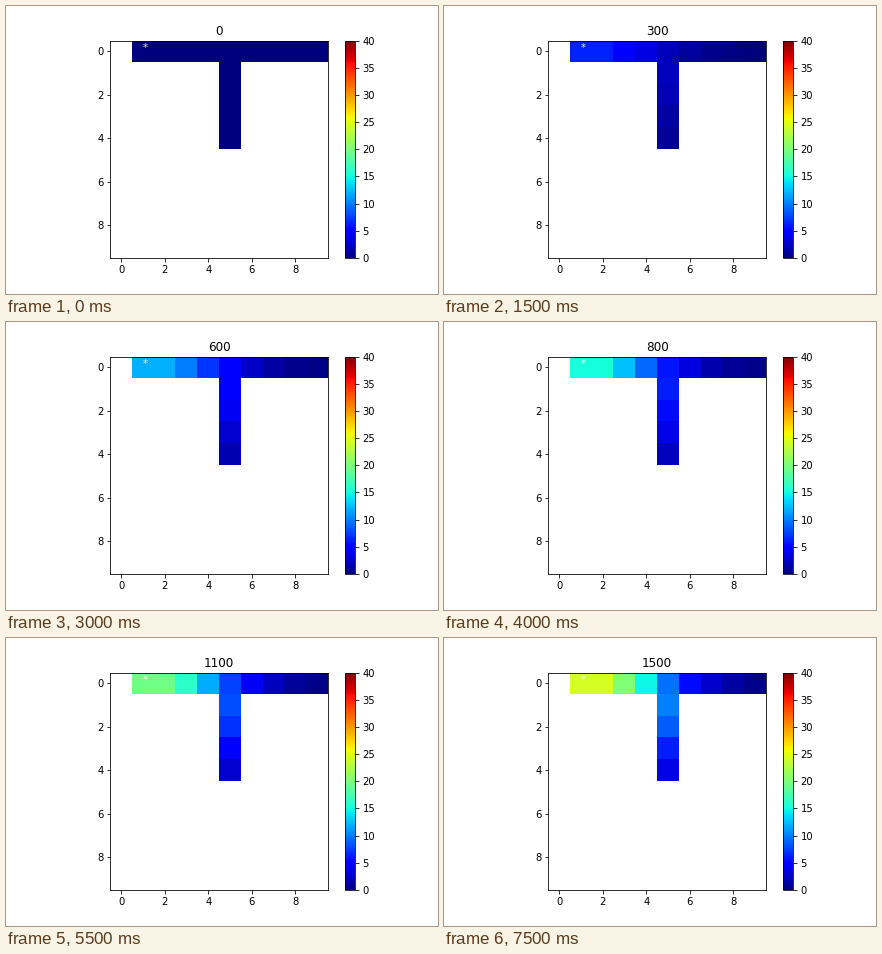
Animation, 432 px wide and 288 px high, one loop 8000 ms. Source, as a matplotlib script:

```python
import numpy as np
import matplotlib.pyplot as plt
from matplotlib.animation import FuncAnimation

FRAMES, STEP, SIZE = 16, 100, 10
STEM = 5  # column of the corridor leading down


def bell(distance, width):
    return np.exp(-np.abs(distance / width) ** 1.8)


def make_shares():
    """Share of the peak value in each open cell; walls are NaN."""
    grid = np.full((SIZE, SIZE), np.nan)
    cols, rows = np.arange(1, SIZE), np.arange(1, 5)
    grid[0, cols] = bell(cols - 1.5, 3.55)
    grid[rows, STEM] = 0.4 * bell(rows - 1, 3)
    return grid


SHARES = make_shares()
LAGS = 70 + 120 * (1 - SHARES)  # weaker cells start learning later


def rise(episode, scale):
    return 1 - np.exp(-episode / scale)


def values(episode):
    return 48 * rise(episode, 2030) * SHARES * rise(episode, LAGS)


plt.rcParams.update({"font.family": "DejaVu Sans", "font.size": 10})
fig, ax = plt.subplots(figsize=(6, 4), dpi=72, facecolor="white")
fig.subplots_adjust(left=0.125, right=0.9, bottom=0.125, top=0.88)

image = ax.imshow(values(0), cmap="jet", vmin=0, vmax=40,
                  interpolation="nearest")
ax.set_xticks(range(0, SIZE, 2))
ax.set_yticks(range(0, SIZE, 2))
fig.colorbar(image, ax=ax, ticks=range(0, 41, 5))
ax.text(1, 0, "*", color="white")
title = ax.set_title("0")


def update(frame):
    episode = frame * STEP
    image.set_data(values(episode))
    title.set_text(str(episode))
    return image, title


anim = FuncAnimation(fig, update, frames=FRAMES, interval=500,
                     repeat=True, repeat_delay=0)
plt.show()
```
